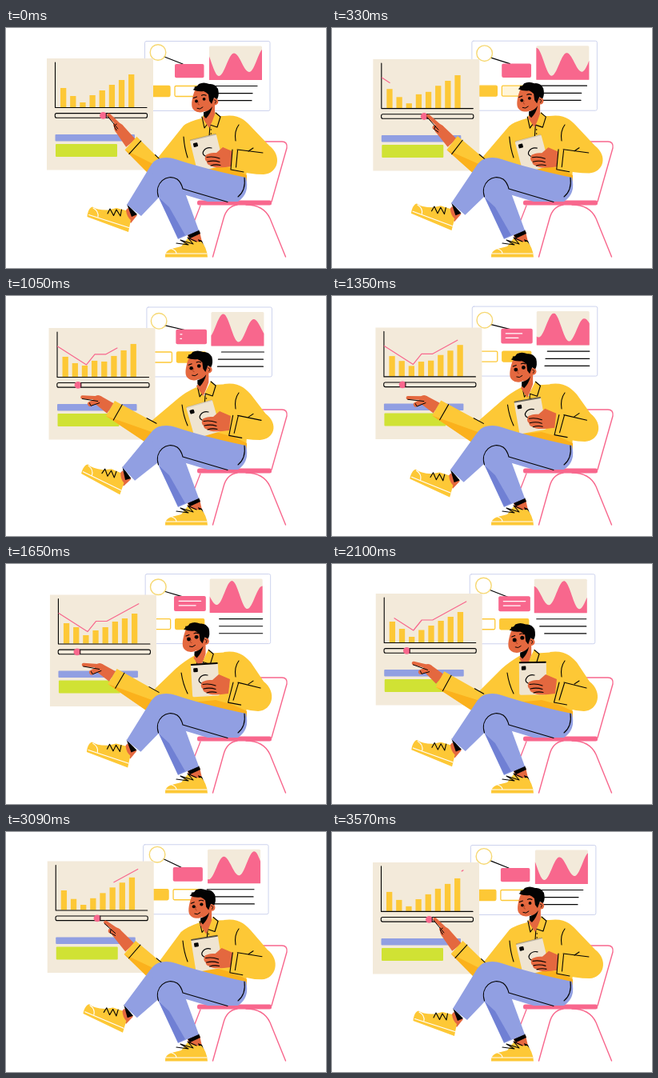
These frames come from a looping animation (400 px wide and 300 px high, 3.6 s). An HTML page with a canvas:

```html
<!DOCTYPE html>
<html lang="en">
<head>
<meta charset="utf-8">
<title>Working with charts</title>
<style>
html, body { margin: 0; width: 100%; height: 100%; overflow: hidden; background: #fff; }
canvas { display: block; width: 400px; height: 300px; }
</style>
</head>
<body>
<canvas id="stage"></canvas>
<script>
const LOOP = 3600, STEP = 30;
const INK = '#030303', PINK = '#f8678d', YELLOW = '#fdc836', AMBER = '#fbb11c',
  BLUE = '#919fe2', DEEP = '#7080d4', GREEN = '#d0e234', CREAM = '#f3eada',
  SKIN = '#e4683f', WHITE = '#fff';

const canvas = document.getElementById('stage');
const ctx = canvas.getContext('2d');
const dpr = window.devicePixelRatio || 1;
canvas.width = 400 * dpr;
canvas.height = 300 * dpr;

let now = 0;
const KEYS = [0, 630, 1050, 1650, 2100, 2640];
const clamp = v => Math.max(0, Math.min(1, v));
const mix = (a, b, k) => a + (b - a) * k;
const ramp = (a, b) => { const k = clamp((now - a) / (b - a)); return k * k * (3 - 2 * k); };

// Smooth periodic curve through one value per key time.
function cyc(...v) {
  const n = KEYS.length;
  const time = i => KEYS[(i + n) % n] + Math.floor(i / n) * LOOP;
  const val = i => v[(i + n) % n];
  const slope = i => (val(i + 1) - val(i - 1)) / (time(i + 1) - time(i - 1));
  let i = n - 1;
  while (KEYS[i] > now) i--;
  const h = time(i + 1) - time(i), s = (now - time(i)) / h, s2 = s * s, s3 = s2 * s;
  return (2 * s3 - 3 * s2 + 1) * val(i) + (s3 - 2 * s2 + s) * h * slope(i)
    + (3 * s2 - 2 * s3) * val(i + 1) + (s3 - s2) * h * slope(i + 1);
}

// Straight interpolation through [time, value] stops.
function stops(list) {
  for (let i = 1; i < list.length; i++) {
    const [t0, a] = list[i - 1], [t1, b] = list[i];
    if (now <= t1) return mix(a, b, clamp((now - t0) / (t1 - t0)));
  }
  return list[list.length - 1][1];
}

function fill(path, color) {
  ctx.fillStyle = color;
  ctx.fill(typeof path === 'string' ? new Path2D(path) : path);
}
function line(path, color = INK, width = 1.1) {
  ctx.strokeStyle = color;
  ctx.lineWidth = width;
  ctx.stroke(typeof path === 'string' ? new Path2D(path) : path);
}
function poly(points, closed = true) {
  const p = new Path2D();
  points.forEach(([x, y]) => p.lineTo(x, y));
  if (closed) p.closePath();
  return p;
}
function box(x0, y0, x1, y1, r = 0) {
  const p = new Path2D();
  p.roundRect(x0, y0, x1 - x0, y1 - y0, r);
  return p;
}
function disc(x, y, r, ry = r) {
  const p = new Path2D();
  p.ellipse(x, y, r, ry, 0, 0, Math.PI * 2);
  return p;
}
function group(dx, dy, draw) {
  ctx.save();
  ctx.translate(dx, dy);
  draw();
  ctx.restore();
}
function faded(alpha, draw) {
  ctx.save();
  ctx.globalAlpha *= clamp(alpha);
  draw();
  ctx.restore();
}

const mixPoint = (a, b, k) => [mix(a[0], b[0], k), mix(a[1], b[1], k)];
const shift = (p, n, k) => [p[0] + n[0] * k, p[1] + n[1] * k];

// Unit normal to the segment a-b.
function normal(a, b) {
  const x = b[0] - a[0], y = b[1] - a[1], d = Math.hypot(x, y);
  return [y / d, -x / d];
}

// Part of a polyline between two fractions of its length.
function trimmed(points, from, to) {
  const lens = points.slice(1).map((p, i) => Math.hypot(p[0] - points[i][0], p[1] - points[i][1]));
  const total = lens.reduce((a, b) => a + b, 0);
  const out = [];
  let done = 0;
  lens.forEach((len, i) => {
    const a = clamp((from * total - done) / len), b = clamp((to * total - done) / len);
    if (b > a) [a, b].forEach(k => out.push(mixPoint(points[i], points[i + 1], k)));
    done += len;
  });
  return poly(out, false);
}

// Alternating tall and short crests, u measured from a tall crest.
function waveHeight(u) {
  const levels = [2.5, 37.5, 9, 32.5, 2.5];
  const s = (((u % 76) + 76) % 76) / 19, i = Math.floor(s);
  return mix(levels[i], levels[i + 1], (1 - Math.cos((s - i) * Math.PI)) / 2);
}

function toggleBox(x0, x1, amount) {
  const shape = box(x0, 72.5, x1, 85.5, 1.5);
  faded(amount, () => fill(shape, YELLOW));
  line(shape, YELLOW, 1.3);
}

function backPanel(phase) {
  const swell = (1 - Math.cos(phase)) / 2;
  const dx = 2.5 * Math.sin(phase), dy = -4 * swell;
  group(dx, dy, () => {
    const frame = box(173.5, 16.5, 330, 103.5, 2);
    fill(frame, WHITE);
    line(frame, '#cdd3ee', 1);

    fill(box(254, 22.5, 320, 65, 1.5), CREAM);
    const wave = [[254, 65]];
    const crest = 69 + now * 76 / LOOP;
    for (let x = 0; x <= 66; x++) wave.push([254 + x, 22.5 + waveHeight(x - crest)]);
    wave.push([320, 65]);
    fill(poly(wave), PINK);

    [[72.5, cyc(254, 262, 267, 266, 257, 254), cyc(314, 320, 320, 320, 319, 312)],
     [81.7, cyc(254, 258, 263, 266, 261, 254), cyc(308, 314, 319, 320, 319, 315)],
     [90.7, cyc(254, 258, 262, 266, 267, 255), cyc(307, 314, 319, 320, 319, 318)]
    ].forEach(([y, a, b]) => line(`M${a},${y}H${b}`, INK, 1.2));

    const second = stops([[150, 0], [630, .5], [900, 1], [2300, 1], [2640, .5], [3100, 0]]);
    toggleBox(182, 205, 1 - ramp(640, 1000) + ramp(2250, 2600));
    toggleBox(211, 247, second);
  });

  const cx = 190 + 1.2 * Math.sin(phase);
  const cy = 29.3 + 2.7 * Math.cos(phase - 1.1);
  line(`M${cx + 8},${cy + 5.5}L${221 + dx},${45 + dy}`, INK, 1.2);
  line(disc(cx, cy, 9.8), '#f6d873', 1.4);

  group(dx, dy, () => {
    fill(box(211 - 1.7 * swell, 45 - swell, 247.5 + 1.7 * swell, 62.3 + .6 * swell, 2), PINK);
    const from = ramp(2250, 3050), to = ramp(950, 1550);
    if (to > from) {
      line(trimmed([[215.5, 50.3], [243, 50.3]], from, to), WHITE, 1.2);
      line(trimmed([[215.5, 55.8], [236.5, 55.8]], Math.max(0, from - .1), to), WHITE, 1.2);
    }
  });
}

function barTops() {
  return [
    cyc(75, 75, 74, 73.5, 73, 74),
    cyc(85, 85, 82, 78.5, 82, 85),
    cyc(93, 92, 85, 88.5, 92, 92),
    cyc(84, 79.5, 79, 82.5, 83.5, 84),
    cyc(78, 79.5, 80, 78.5, 78, 78),
    cyc(71, 71.5, 73, 71.5, 72, 71),
    cyc(65, 65, 66, 67.5, 67, 65),
    cyc(58, 58, 58, 61.5, 61, 59)
  ];
}

function chartPanel(phase) {
  group(2 - 2 * Math.cos(phase), 2 * Math.sin(phase), () => {
    fill(box(51, 38, 184, 177.5), CREAM);
    barTops().forEach((top, i) => fill(box(68 + i * 12.15, top, 75.3 + i * 12.15, 99), YELLOW));
    line('M61.5,43V99.5H176', INK, 1.1);

    const from = stops([[1750, 0], [2100, .12], [2640, .47], [3600, 1]]);
    const to = stops([[200, 0], [630, .32], [1050, .74], [1350, .9], [1650, .98], [1800, 1]]);
    if (to > from) {
      line(trimmed([[62, 61], [98, 84], [108.5, 71], [122, 71], [164, 48]], from, to), PINK, 1.2);
    }

    const knob = cyc(121.5, 103.9, 87.5, 85, 89.7, 101.8);
    line(box(61.3, 106.6, 176.5, 112.2, 2), INK, 1.1);
    fill(disc(knob, 109.4, 4.4), PINK);
    line(`M${knob + 3.8},106.8V112`, INK, .9);

    const blue = box(61.5, 133, 161, 141.5, 1);
    const green = box(62, 145, 139, 161, 1);
    fill(blue, BLUE);
    fill(green, GREEN);
    if (now > 500 && now < 900) {
      const x = mix(45, 150, (now - 500) / 400);
      [[blue, DEEP], [green, '#b9cd35']].forEach(([shape, color]) => {
        ctx.save();
        ctx.clip(shape);
        faded(.6, () => fill(poly([[x - 20, 132], [x - 8, 132], [x + 14, 162], [x - 20, 162]]), color));
        ctx.restore();
      });
    }
  });
}

function chair() {
  line('M300,142H345Q352,142 351,150L332,217', PINK, 1.4);
  line('M243,222L236,240', PINK, 1.3);
  line('M258.5,286L272,238Q276,223 289,221', PINK, 1.4);
  line('M300,221Q322,221 330,238L349.5,286', PINK, 1.4);
  fill(box(239, 215.5, 332, 221.5, 2.5), PINK);
}

function head(dx, dy, lean) {
  group(dx, dy, () => {
    fill('M247,99L261,92L261,108Q258,117 254,125L246,113L250,106Z', SKIN);
    fill('M247,105Q254,104 258,98Q256,107 250,113L247,110Z', INK);
    fill('M236,78C233,86 231,95 233,100C236,106 245,107 250,103Q257,100 260,92L258,76Z', SKIN);
    fill(disc(261.3, 92, 4, 4.4), SKIN);
    fill('M233.5,77Q236,76 236,73Q239,74 241,70Q247,67 254,70Q261,69 265,76Q267,84 264,89L260,87L257,95L254,91L253,83Q250,80 247,79Q240,80 233.5,77Z', INK);
    line('M260.5,90Q264,90 261.5,94', INK, .8);
    group(2 * lean, -2 * lean, () => {
      const r = mix(1.9, 2.5, lean);
      fill(disc(238, 91.5, r), INK);
      fill(disc(247.6, 88.8, r), INK);
      line('M234.5,87.5L238.5,86M244.5,84.3Q247,82.8 250,84.3', INK, 1.1);
      line('M241,92Q238.5,96 241.5,96', '#a83f24', .9);
      line('M239,100.5Q242.5,102.5 246,99', INK, 1);
    });
  });
}

function shirt(lean, arm) {
  const neck = -9 * lean, low = 1.5 * lean;
  const shoulder = [mix(222, 212, lean), mix(122, 131, lean)];
  const p = new Path2D();
  p.moveTo(244 + neck, 113 + low);
  p.quadraticCurveTo(mix(228, 222, lean), 117 + 5 * lean, ...shoulder);
  [arm.elbow, arm.top, arm.bottom, [186, 190], [300, 192], [303, 140]].forEach(q => p.lineTo(...q));
  p.quadraticCurveTo(302, 112, 280, 110);
  p.lineTo(266 + neck, 110 + low);
  p.lineTo(254 + neck, 124 + low);
  p.closePath();
  fill(p, YELLOW);
  fill(poly([arm.bottom, [188, 172], [188, 192]]), AMBER);
  fill('M232,173L262,170L284,176L301,184V192H250Z', AMBER);

  const along = k => mixPoint(arm.top, arm.elbow, k);
  const inner = along(.2);
  line(poly([inner, shift(inner, [arm.bottom[0] - arm.top[0], arm.bottom[1] - arm.top[1]], 1)], false));
  line(poly([along(.87), along(1.13)], false));
  line(`M${mix(222, 219, lean)},136Q${mix(223, 221, lean)},150 227,162`);
  group(neck, low, () => {
    fill('M244,112L249,107L254,121L249,126Z', YELLOW);
    fill('M262,105L268,111L264,125L254,121Z', YELLOW);
    line('M245,111L248,125L254,117M262,106L268,111L264,124L255,121L254,136');
    [127, 132].forEach(y => fill(disc(256.3, y, .8), INK));
  });
}

function armPose() {
  const cuff = [cyc(156, 142, 130.5, 133, 135, 149.5), cyc(144, 143, 140.5, 140.5, 144, 144.5)];
  const n = normal(cuff, [188, 173]);
  return {
    cuff,
    elbow: [cyc(190, 186, 182, 185, 184, 192), cyc(162, 160, 156, 157, 159, 160)],
    top: shift(cuff, n, 11),
    bottom: shift(cuff, n, -11)
  };
}

function pointingHand(arm) {
  const knuckle = [cyc(141, 125, 115, 117, 120, 131), cyc(125, 128, 130, 130, 131, 127)];
  const tip = [cyc(128.5, 109, 95.5, 97, 102, 116), cyc(109, 114, 126.5, 126, 124, 118)];
  const curl = [cyc(137, 117, 105, 107, 111, 121), cyc(121, 129, 135, 135.5, 135, 128)];
  const n = normal(knuckle, arm.cuff);
  fill(poly([shift(knuckle, n, 6), shift(arm.cuff, n, 7.5), shift(arm.cuff, n, -7.5), shift(knuckle, n, -6)]), SKIN);
  fill(disc(...knuckle, 6), SKIN);
  line(poly([knuckle, curl], false), SKIN, 6);
  line(poly([shift(knuckle, n, 3), tip], false), SKIN, 4.6);
  const m = normal(tip, knuckle), c = normal(curl, knuckle);
  line(poly([shift(tip, m, -2), shift(knuckle, m, -1.5)], false), INK, 1);
  line(poly([shift(curl, c, 1.5), shift(curl, c, -2.6), shift(knuckle, c, -4)], false), INK, 1);
}

function tablet() {
  group(cyc(251, 249, 247, 249, 251, 251), cyc(156, 157, 154, 145, 143, 148), () => {
    ctx.rotate(cyc(-.24, -.27, -.28, -.06, -.01, -.08));
    fill(box(-17, -20.5, 17, 20.5, 2), '#efe4d1');
    faded(cyc(.2, .1, .1, 1, 1, 1), () => line('M-16,-20H16', INK, 2));
    fill(box(-14, -15.5, -8.5, -10.5, 1), INK);
  });
}

function holdingArm(lean) {
  const out = mix(341, 334, lean), low = cyc(183, 180, 180, 184, 184, 185);
  const up = -4 * lean, cuffTop = 283 + lean, cuffEnd = 281 - 3.5 * lean;
  const p = new Path2D();
  p.moveTo(272, 110);
  p.bezierCurveTo(291, 107, 300, 116, 306, 123);
  p.lineTo(out - 12, 147);
  p.bezierCurveTo(out + 5, 160, out - 1, low - 1, out - 19, low);
  p.quadraticCurveTo(out - 36, low, cuffEnd, 177 + up);
  p.lineTo(cuffTop, 152 + up);
  p.lineTo(286, 125);
  p.closePath();
  fill(p, YELLOW);
  line('M291,121Q285,129 287,141');

  group(cyc(0, -2, -4, -5, -4, -3), cyc(0, -1, -5, -11, -11, -8), () => {
    fill('M285,155L271,149L263,156C254,156 249,158 249,161Q248,165 251,167Q251,171 256,172Q260,176 283,173Z', SKIN);
    line('M251,161.5Q259,160 267,163M252,167Q260,165 267,167.5M256,172Q262,170 268,171.5', INK, 1.1);
    line('M257,150C249,148 242,157 249,160', INK, 1.2);
  });
  group(0, up, () => {
    fill(poly([[cuffTop, 152], [cuffTop + 10, 151], [cuffEnd + 10, 178], [cuffEnd, 177]]), YELLOW);
    line(poly([[cuffTop, 152], [cuffEnd, 177], [cuffEnd + 16, 180]], false));
    line(poly([[cuffTop + 6.5, 153], [cuffEnd + 6.5, 174]], false));
    line(poly([[cuffTop + 6, 152], [321 - 3 * lean, 156 + 3 * lean]], false));
    line('M303,154L309,150');
  });
}

function crossedShin(angle) {
  ctx.save();
  ctx.translate(195, 178);
  ctx.rotate(angle);
  ctx.translate(-195, -178);
  fill('M152,225L164,234L156,244L147,232Z', SKIN);
  fill('M151,220L164,233L157,236Z', INK);
  fill('M101.5,236C102,229 105,224 108,223.5Q114,228 128,227.5L138,225L150,228Q151,236 156,240L153,255Z', YELLOW);
  line('M103.5,233.5L153.5,249.5M109,225Q116,229 115,236', WHITE, 1.1);
  line('M127,232L130,226L134.5,234.5L138,227L143,235L144.5,227', INK, 1.1);
  fill('M179,175L151,221L169,235L208,194Q208,164 193,163Q185,164 179,175Z', BLUE);
  ctx.restore();
}

function legs(lift) {
  fill('M227,258L242,254L246,272L230,272Z', SKIN);
  fill('M227,259L241,252L243,257L230,263Z', INK);
  fill('M240,264L245,266L248,274L242,270Z', INK);
  fill('M199,286.5Q198,279 207,276L219,273L227,263Q234,268 244,267Q251,274 252,286.5Z', YELLOW);
  line('M200,282H251M207,276Q213,278 213,282', WHITE, 1.1);
  line('M213,269L228,271L218,265L234,270L227,262L238,267', INK, 1.1);

  crossedShin(.155 * lift);
  fill('M181,173C188,160 202,161 212,164Q248,176 300,187Q305,207 290,217H252L222,208L192,214Z', BLUE);
  fill('M190,210C184,193 203,181 215,190L222,201L241,253L215,264Z', BLUE);
  fill('M191,212L215,263L224,259L204,224Z', DEEP);
  line('M190.5,211C185,194 201,181 214,189Q219,193 221,201L277,217.5', INK, 1.1);
  line('M298,187Q300,203 290,211', INK, 1.1);
}

function draw() {
  const phase = now / LOOP * Math.PI * 2;
  const lean = cyc(0, .27, .65, .97, 1, .7);
  const lift = (1 - Math.cos(phase * 2)) / 2;
  const arm = armPose();
  ctx.setTransform(dpr, 0, 0, dpr, 0, 0);
  ctx.lineCap = ctx.lineJoin = 'round';
  ctx.fillStyle = WHITE;
  ctx.fillRect(0, 0, 400, 300);
  backPanel(phase);
  chartPanel(phase);
  chair();
  pointingHand(arm);
  shirt(lean, arm);
  head(-11.8 * lean, cyc(0, -1, 0, 4.5, 5.5, 4.5), lean);
  tablet();
  legs(lift);
  holdingArm(lean);
}

function tick() {
  now = Math.floor(performance.now() % LOOP / STEP) * STEP;
  draw();
  requestAnimationFrame(tick);
}
tick();
</script>
</body>
</html>
```
